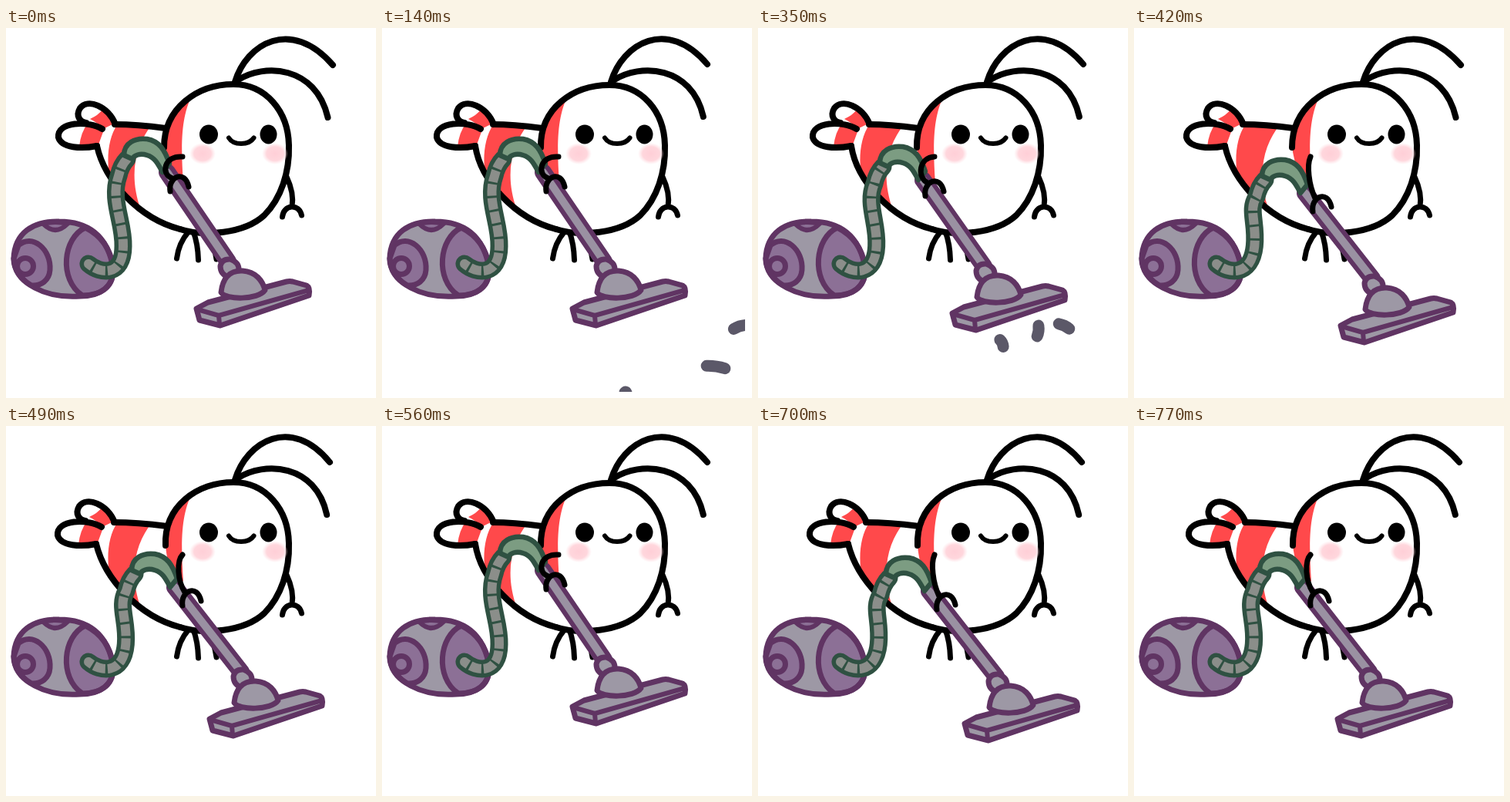
Animation, 480 px wide and 480 px high, one loop 840 ms. Source, as an HTML page:

```html
<!DOCTYPE html>
<html lang="en">
<head>
<meta charset="utf-8">
<title>Vacuuming shrimp</title>
<style>
  html, body { margin: 0; width: 100%; height: 100%; overflow: hidden; background: #fff; }
  svg { display: block; width: 100%; height: 100%; }
  path, line { stroke-linecap: round; stroke-linejoin: round; }
  .ink { fill: none; stroke: #000; stroke-width: 8; }
  .red { fill: #ff494b; }
  .thin { stroke-width: 7; }
  .grey { fill: #9d98a5; }
  .mauve { fill: #8c7096; }
  .plum { stroke: #603463; stroke-width: 7; }
  .none { fill: none; }
  .tube { fill: none; stroke: #2f5142; }
</style>
</head>
<body>
<svg viewBox="0 0 480 480">
  <defs>
    <radialGradient id="blush">
      <stop offset="0" stop-color="#ffcfd7"/>
      <stop offset=".65" stop-color="#ffd2d9" stop-opacity=".9"/>
      <stop offset="1" stop-color="#ffdde2" stop-opacity="0"/>
    </radialGradient>
    <clipPath id="dustArea"><path d="M0 0H471V472H0Z"/></clipPath>
    <clipPath id="bodyArea"><path id="bodyClip"/></clipPath>
    <clipPath id="headArea"><path id="headClip"/></clipPath>
  </defs>

  <g id="antennae" class="ink"><path id="antennaA"/><path id="antennaB"/></g>
  <g class="ink thin">
    <path d="M237 264Q224 279 221.500 299M243 264Q249 280 249.500 301M262 264Q270 280 273 300"/>
    <path d="M364 193Q374 214 371 232M358.500 245C360 229 380 227 383.500 243"/>
  </g>

  <path id="bodyFill" fill="#fff"/>
  <g clip-path="url(#bodyArea)">
    <path class="red" d="M148 120H194C170 146 157 186 175 236L136 205C129 170 132 140 148 120Z"/>
  </g>
  <g id="tail">
    <path fill="#fff" d="M142 125C132 101 106 91 96 104C89 114 95 122 102 123C82 117 66 128 68 142C72 156 98 157 119 152L130 136Z"/>
    <path class="red" d="M109 118Q120 113 125 106Q136 113 140 124L126 131Q119 123 109 118ZM95 154Q97 135 106 124Q118 125 127 132L119 154Z"/>
    <path class="ink" d="M142 125C132 101 106 91 96 104C90 114 96 122 104 123M125 131C107 120 66 121 68 142C72 156 98 157 118 153"/>
  </g>
  <path id="headFill" fill="#fff"/>
  <g clip-path="url(#headArea)">
    <path class="red" d="M244 82C228 111 226 143 230 202L221 190L196 160V100Z"/>
  </g>
  <path id="bodyLine" class="ink"/>
  <path id="headLine" class="ink"/>

  <g id="face">
    <ellipse cx="255" cy="163" rx="17" ry="14" fill="url(#blush)"/>
    <ellipse cx="349" cy="163" rx="17" ry="14" fill="url(#blush)"/>
    <ellipse cx="263" cy="138" rx="12" ry="12.500"/>
    <ellipse cx="340.500" cy="138" rx="11" ry="12.500"/>
    <path class="ink" style="stroke-width:6" d="M289 142.500C295 152.500 315 152.500 321.500 142.500"/>
  </g>

  <g id="canister">
    <path class="grey" d="M10 299C11 266 35 250 69 251C105 251 132 268 139 312C140 337 121 348 96 348C52 351 12 332 10 299Z"/>
    <path class="mauve plum" d="M16 282C34 266 59 287 57 314C56 327 46 335 33 334C18 326 10 313 10 299Z"/>
    <circle class="mauve plum" cx="25" cy="309" r="10.500"/>
    <path class="mauve plum" d="M103 259C74 272 68 326 99 347C124 347 141 335 139 310C135 283 121 268 103 259Z"/>
    <path class="mauve plum" style="stroke-width:6" d="M48 254Q64 270 80 254Q64 250 48 254Z"/>
    <path class="none plum" d="M10 299C11 266 35 250 69 251C105 251 132 268 139 312C140 337 121 348 96 348C52 351 12 332 10 299Z"/>
  </g>

  <g id="dust" clip-path="url(#dustArea)" fill="none" stroke="#5b5868" stroke-width="15"></g>

  <path id="pipeEdge" fill="none" stroke="#603463" stroke-width="22"/>
  <path id="pipe" fill="none" stroke="#9a91a2" stroke-width="10"/>

  <g id="nozzle">
    <path class="grey plum" d="M247 364L262 356L364 329Q368 328 372 329L390 334Q395 337 393 347L278 386L251 379Z"/>
    <path class="none plum" style="stroke-width:6" d="M248 365L276 373L393 340M276 373L277 385"/>
    <path class="grey plum" d="M278 309Q280 299 291 300Q303 304 302 315L290 324Q278 320 278 309Z"/>
    <path class="grey plum" d="M279 343C281 324 291 314 307 315C324 316 333 328 336 340C327 353 285 353 279 343Z"/>
  </g>

  <path id="hoseEdge" class="tube" stroke-width="23"/>
  <path id="hose" class="none" stroke="#8b8e8a" stroke-width="12"/>
  <path id="ridges" class="tube" style="stroke-linecap:butt" stroke-width="15" stroke-dasharray="3 15" stroke-dashoffset="-24"/>
  <path id="handle" fill="#7c9c82" stroke="#2f5142" stroke-width="6.500"
    d="M153 165C153 149 168 142 183 144C199 147 206 158 212 176L203 187C197 176 193 168 183 165C174 162 166 165 164 170Z"/>
  <path id="arm" class="ink thin"/>
</svg>
<script>
const STEP = 70, STEPS = 12;
const $ = id => document.getElementById(id);
const draw = (d, ...ids) => ids.forEach(id => $(id).setAttribute('d', d));
const move = (id, x, y) => $(id).setAttribute('transform', `translate(${x} ${y})`);

// Redraw wobble: tail x, head's left edge x, head top y, antenna tip x and y
const WOBBLE = [[0, 0, 0, 0, 0], [-1, 2, 0, -4, -1], [3, 1, 1, -2, -1]];

// Stroke poses: nozzle x, y, handle x, y, hand x, y
const REST = [0, 0, 0, 0, 0, 0];
const STROKE = [REST, [5, 6, 5, 10, 4, 6], [21, 22, 13, 27, 19, 26], [17, 16, 10, 22, 16, 21]];

// Crumbs by step: x, y, angle, length
const CRUMBS = {
  2: [[316, 473, 10, 14], [433, 440, 8, 38], [464, 388, -18, 30]],
  3: [[319, 447, 45, 22], [399, 421, 35, 32], [430, 390, 0, 33]],
  4: [[319, 419, 75, 27], [368, 403, 65, 28], [403, 392, 12, 34]],
  5: [[316, 409, 65, 24], [363, 393, 97, 28], [397, 387, 25, 29]]
};

function drawBody([tail, left, top, ax, ay]) {
  move('tail', tail, 0);
  draw(`M297 70C312 20 370 -14 ${424 + ax} ${48 + ay}`, 'antennaA');
  draw(`M300 68C335 45 402 49 ${417.5 + ax / 3} ${116 + ay}`, 'antennaB');

  const x = 207 + left, y = 73 + top;
  const upper = `M${141 + tail} 125Q170 125 ${x} 130`;
  const lower = `M${118 + tail} 153C128 198 172 247 226 261`;
  const front = `C256 271 309 267 335 243C357 221 368 187 367 152C366 108 337 ${y} 295 ${y}C248 ${y} 205 104 ${x - 2} 155`;
  draw(`${upper}L240 262L226 261C172 247 128 198 ${118 + tail} 153Z`, 'bodyFill', 'bodyClip');
  draw(`M226 261${front}C209 181 218 196 226 261Z`, 'headFill', 'headClip');
  draw(upper + lower, 'bodyLine');
  draw(`M226 261${front}`, 'headLine');
}

function drawVacuum([nx, ny, gx, gy, hx, hy]) {
  move('nozzle', nx, ny);
  move('handle', gx, gy);
  draw(`M${209 + gx} ${187 + gy}L${288 + nx} ${303 + ny}`, 'pipeEdge', 'pipe');
  draw(`M107 306C122 319 152 323 ${152 + gx / 3} 283C${153 + gx / 2} 252 ${135 + gx} ${223 + gy / 2} ${146 + gx} ${192 + gy}Q${149 + gx} ${178 + gy} ${157 + gx} ${170 + gy}`,
    'hoseEdge', 'hose', 'ridges');
  draw(`M229 167C${205 + hx} ${165 + hy / 2} ${200 + hx * 1.4} ${190 + hy / 2} ${216 + hx} ${195 + hy}` +
    `M${213 + hx} ${212 + hy}C${210 + hx} ${193 + hy} ${232 + hx} ${183 + hy} ${237 + hx} ${206 + hy}`, 'arm');
}

function drawDust(step) {
  $('dust').innerHTML = (CRUMBS[step] || []).map(([x, y, angle, length]) => {
    const r = Math.max(1, length / 2 - 7);
    return `<path transform="translate(${x} ${y}) rotate(${angle})" d="M${-r} 0Q0 -2 ${r} 0"/>`;
  }).join('');
}

let shown = -1;
function show(step) {
  if (step === shown) return;
  shown = step;
  drawBody(WOBBLE[step % 3]);
  drawVacuum(step < 4 ? REST : STROKE[step % 4]);
  drawDust(step);
}

const start = performance.now();
function tick() {
  show(Math.floor((performance.now() - start) / STEP) % STEPS);
  requestAnimationFrame(tick);
}
tick();
</script>
</body>
</html>
```
